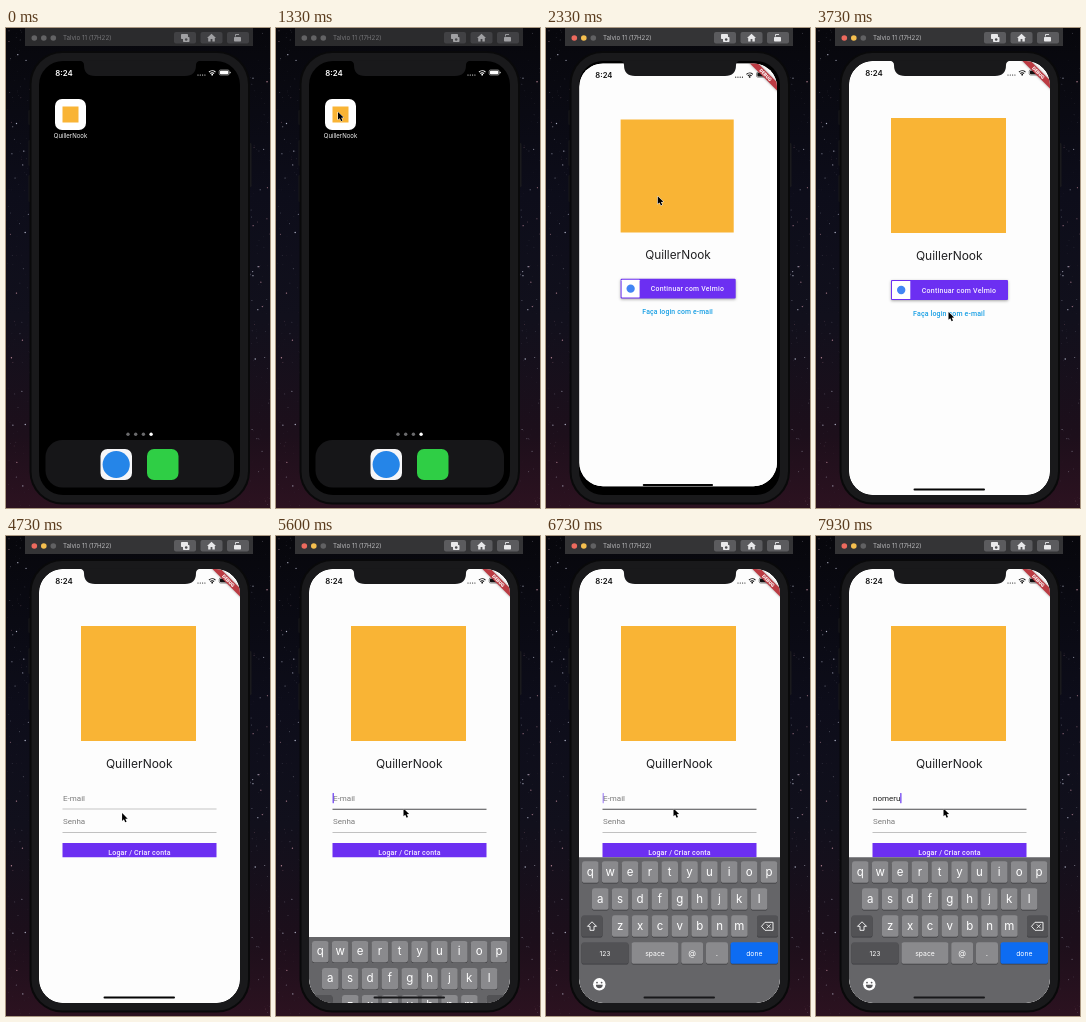
Write an HTML page with a canvas that moves like this. It is 264x480 px and loops after 8 s.

```html
<!DOCTYPE html>
<html lang="pt">
<head>
<meta charset="utf-8">
<title>Login demo</title>
<style>
html, body { margin: 0; width: 100%; height: 100%; overflow: hidden; background: #08080c; }
canvas { display: block; width: 264px; height: 480px; }
</style>
</head>
<body>
<canvas id="stage"></canvas>
<script>
const W = 264, H = 480, LOOP = 8000;
const SCR = { x: 33, y: 33, w: 201, h: 434 };
const ICON = { x: 49, y: 71, w: 31, h: 31 };
const APP = 'QuillerNook';
const SANS = 'Inter, "Open Sans", sans-serif';
const ROBO = 'Roboto, "Noto Sans", sans-serif';
const PURPLE = '#6c2ff2', ORANGE = '#f9b435';

const canvas = document.getElementById('stage');
const dpr = window.devicePixelRatio || 1;
canvas.width = W * dpr;
canvas.height = H * dpr;
let ctx = canvas.getContext('2d');

const clamp = v => Math.min(1, Math.max(0, v));
const mix = (a, b, p) => a + (b - a) * p;
const ramp = (t, a, b) => clamp((t - a) / (b - a));
const smooth = u => u * u * (3 - 2 * u);
const easeOut = u => 1 - (1 - u) ** 3;

function box(x, y, w, h, r, color) {
  ctx.beginPath();
  ctx.roundRect(x, y, w, h, r);
  ctx.fillStyle = color;
  ctx.fill();
}

function dot(x, y, r, color) {
  ctx.beginPath();
  ctx.arc(x, y, r, 0, Math.PI * 2);
  ctx.fillStyle = color;
  ctx.fill();
}

function line(color, width, ...pts) {
  ctx.beginPath();
  for (let i = 0; i < pts.length; i += 2) ctx.lineTo(pts[i], pts[i + 1]);
  ctx.strokeStyle = color;
  ctx.lineWidth = width;
  ctx.stroke();
}

function text(str, x, y, size, color, { font = SANS, weight = 400, align = 'center', gap = 0 } = {}) {
  ctx.font = `${weight} ${size}px ${font}`;
  ctx.letterSpacing = gap + 'px';
  ctx.textAlign = align;
  ctx.textBaseline = 'alphabetic';
  ctx.fillStyle = color;
  ctx.fillText(str, x, y);
}

function group(fn, alpha = 1) {
  ctx.save();
  ctx.globalAlpha *= alpha;
  fn();
  ctx.restore();
}

// Night sky, painted once
function paintSky() {
  const c = document.createElement('canvas');
  c.width = canvas.width;
  c.height = canvas.height;
  const main = ctx;
  ctx = c.getContext('2d');
  ctx.scale(dpr, dpr);
  const g = ctx.createLinearGradient(0, 0, 0, H);
  g.addColorStop(0, '#07070c');
  g.addColorStop(0.35, '#0d0d1a');
  g.addColorStop(0.6, '#11101c');
  g.addColorStop(0.85, '#1d0f1b');
  g.addColorStop(1, '#2c1220');
  ctx.fillStyle = g;
  ctx.fillRect(0, 0, W, H);
  let seed = 77;
  const rnd = () => (seed = (seed * 16807) % 2147483647) / 2147483647;
  for (let i = 0; i < 260; i++) {
    const left = rnd() < 0.5;
    const x = left ? rnd() * 24 : 243 + rnd() * 21;
    const b = rnd();
    ctx.globalAlpha = 0.15 + 0.75 * b ** 3;
    dot(x, rnd() * H, 0.3 + 0.4 * b ** 4, i % 4 ? '#c9cbe0' : '#c58fa0');
  }
  ctx = main;
  return c;
}
const sky = paintSky();

function titleBar(active) {
  box(19, 0, 228, 18, 0, active ? '#343436' : '#2b2b2d');
  const lights = active ? ['#ed6a5e', '#f5bf4f', '#616163'] : ['#626264', '#626264', '#626264'];
  lights.forEach((c, i) => dot(28.3 + i * 9.5, 10, 2.8, c));
  text('Talvio 11 (17H22)', 57, 12.2, 6.2, active ? '#b9b9bb' : '#77777a', { align: 'left' });
  const ink = active ? '#e8e8ea' : '#a0a0a3';
  for (const x of [168, 194.5, 221]) box(x, 4, 22, 11.5, 2, active ? '#5b5b5e' : '#414144');
  box(175, 6, 7, 5, 0.8, ink);
  box(177, 9, 6.5, 5, 0.8, ink);
  dot(180.2, 11.5, 1.3, '#4c4c4f');
  ctx.beginPath();
  for (const p of [[205.5, 5.8], [210, 10], [208.8, 10], [208.8, 13.5], [206.4, 13.5], [206.4, 11], [204.6, 11], [204.6, 13.5], [202.2, 13.5], [202.2, 10], [201, 10]]) ctx.lineTo(...p);
  ctx.fillStyle = ink;
  ctx.fill();
  box(228, 9, 7, 4.5, 0.8, ink);
  line(ink, 0.9, 229.5, 8.5, 229.5, 6.5, 233, 6.5);
}

function phoneBody() {
  for (const [x, y, h] of [[22.5, 82, 15], [22.5, 112, 26], [22.5, 147, 27], [243, 115, 44]]) box(x, y, 2.5, h, 1, '#1a1a1d');
  box(23.5, 23, 220.5, 453.5, 33, '#09090a');
  box(25.5, 25, 216.5, 449.5, 31, '#19191b');
  box(SCR.x, SCR.y, SCR.w, SCR.h, 24, '#000');
}

function notch() {
  ctx.beginPath();
  ctx.moveTo(73, 32.5);
  ctx.quadraticCurveTo(78, 33, 78, 37);
  ctx.quadraticCurveTo(78, 48, 89, 48);
  ctx.lineTo(179, 48);
  ctx.quadraticCurveTo(190, 48, 190, 37);
  ctx.quadraticCurveTo(190, 33, 195, 32.5);
  ctx.fillStyle = '#19191b';
  ctx.fill();
}

function statusBar(ink) {
  text('8:24', 58, 47.6, 7.8, ink, { weight: 600 });
  for (let i = 0; i < 4; i++) dot(192 + i * 2.3, 47, 0.6, ink);
  ctx.strokeStyle = ink;
  ctx.lineWidth = 1.1;
  for (const r of [2.6, 4.6]) {
    ctx.beginPath();
    ctx.arc(206.2, 47.4, r, -2.36, -0.78);
    ctx.stroke();
  }
  dot(206.2, 46.7, 0.9, ink);
  ctx.lineWidth = 0.5;
  ctx.beginPath();
  ctx.roundRect(213.2, 42, 10, 5, 1.4);
  ctx.stroke();
  box(214, 42.8, 8.4, 3.4, 0.8, ink);
  box(223.8, 43.7, 0.8, 1.6, 0.4, ink);
}

function home(p) {
  ctx.save();
  ctx.globalAlpha = 1 - 0.75 * p;
  statusBar('#fff');
  if (p > 0) {
    const s = 1 - 0.046 * p;
    ctx.filter = `blur(${4 * p * dpr}px)`;
    ctx.translate(133.5, 250);
    ctx.scale(s, s);
    ctx.translate(-133.5, -250);
  }
  if (p === 0) {
    box(ICON.x, ICON.y, ICON.w, ICON.h, 7, '#fff');
    box(56.5, 78.5, 16, 16, 0, ORANGE);
  }
  text(APP, 64.5, 109.8, 6, '#f2f2f2');
  for (let i = 0; i < 4; i++) dot(122 + i * 7.7, 406.2, 1.7, i === 3 ? '#fff' : '#6a6a6c');
  box(39.5, 412, 188.5, 47.5, 17, '#161618');
  box(94.5, 421, 31.5, 31, 7, '#f6f6f8');
  dot(110.2, 436.5, 13.6, '#2585e8');
  box(141, 421, 31.5, 31, 7, '#2fce45');
  ctx.restore();
}

function debugRibbon() {
  ctx.save();
  ctx.translate(SCR.x + SCR.w, SCR.y);
  ctx.rotate(Math.PI / 4);
  ctx.shadowColor = 'rgba(0,0,0,.4)';
  ctx.shadowBlur = 2.5 * dpr;
  ctx.fillStyle = '#bb3a42';
  ctx.fillRect(-22, 13.6, 44, 5.9);
  ctx.shadowColor = 'transparent';
  text('DEBUG', 0, 18.2, 4.8, '#fff', { font: ROBO, weight: 900 });
  ctx.restore();
}

function signInChoices() {
  ctx.save();
  ctx.shadowColor = 'rgba(0,0,0,.35)';
  ctx.shadowBlur = 3 * dpr;
  ctx.shadowOffsetY = dpr;
  box(75, 252, 117, 20, 1, PURPLE);
  ctx.restore();
  box(76, 253, 18.3, 18, 0.5, '#fff');
  dot(85.2, 262, 4.2, '#4285f4');
  text('Continuar com Velmio', 143, 264.5, 7, '#f4efff', { font: ROBO, weight: 500, gap: 0.25 });
  text('Faça login com e-mail', 133, 287.5, 7, '#189fe4', { font: ROBO, weight: 500, gap: 0.14 });
}

const USER = 'nomeru';
const KEY_TIMES = [7070, 7300, 7470, 7600, 7740, 7870];
const FOCUS = 5547;

function caretAlpha(t) {
  if (t < FOCUS) return 0;
  if (t < 6170 || t >= KEY_TIMES[0]) return 1;
  return t < 6670 ? 1 - easeOut(ramp(t, 6170, 6420)) : easeOut(ramp(t, 6670, 6920));
}

function emailForm(t) {
  const left = { font: ROBO, align: 'left' };
  const typed = USER.slice(0, KEY_TIMES.filter(k => t >= k).length);
  text(typed || 'E-mail', 57, 265, 8, typed ? '#222' : '#7c7c7c', left);
  const end = typed ? 57.3 + ctx.measureText(typed).width : 57;
  group(() => box(end - 0.4, 257, 1.2, 10.3, 0.5, '#6435f0'), caretAlpha(t));
  const focused = t >= FOCUS;
  box(56.5, 272.7, 154, focused ? 1 : 0.6, 0, focused ? '#4a4a4c' : '#8b8b8b');
  text('Senha', 57, 288, 8, '#7c7c7c', left);
  box(56.5, 296.5, 154, 0.6, 0, '#858585');
  box(56.5, 307, 154, 14.3, 0, PURPLE);
  text('Logar / Criar conta', 133.5, 318.6, 7, '#f4efff', { font: ROBO, weight: 500, gap: 0.2 });
}

function key(x, y, w, label, color, size = 6.8) {
  box(x, y + 0.7, w, 21.5, 2.6, '#3a3a3c');
  box(x, y, w, 21.5, 2.6, color);
  if (label) text(label, x + w / 2, y + (size > 9 ? 14.4 : 13.4), size, '#fff');
}

function keyboard(t) {
  const top = 321.3 + 146 * Math.exp(-(t - FOCUS) / 89);
  const light = '#8a8a8d', dark = '#525255';
  ctx.save();
  ctx.translate(0, top);
  box(SCR.x, 0, SCR.w, 160, 0, '#656568');
  [['qwertyuiop', 36], ['asdfghjkl', 46], ['zxcvbnm', 66]].forEach(([row, x], r) => {
    [...row].forEach((c, i) => key(x + i * 19.85, 4 + r * 27, 16.6, c, light, 11.5));
  });
  key(35.5, 58, 21, '', dark);
  key(211, 58, 21, '', dark);
  line('#fff', 0.9, 46, 64.5, 50.5, 69, 48, 69, 48, 73, 44, 73, 44, 69, 41.5, 69, 46, 64.5);
  line('#fff', 0.9, 215.5, 69, 219, 65, 227, 65, 227, 73, 219, 73, 215.5, 69);
  line('#fff', 0.8, 220.7, 67, 224.7, 71);
  line('#fff', 0.8, 224.7, 67, 220.7, 71);
  key(35.5, 85, 47, '123', dark);
  key(85.5, 85, 47, 'space', light);
  key(135.2, 85, 22, '@', light, 8);
  key(160, 85, 22, '.', light, 8);
  key(184.5, 85, 47.5, 'done', '#0d6cf2');
  dot(53.3, 127, 6.2, '#fff');
  dot(51, 125.3, 0.9, '#59595c');
  dot(55.6, 125.3, 0.9, '#59595c');
  ctx.beginPath();
  ctx.arc(53.3, 127.5, 3.4, 0, Math.PI);
  ctx.fillStyle = '#59595c';
  ctx.fill();
  ctx.restore();
}

function app(t) {
  box(SCR.x, SCR.y, SCR.w, SCR.h, 0, '#fdfdfd');
  statusBar('#111');
  box(75, 90, 115, 115, 0, ORANGE);
  text(APP, 133.3, 232.3, 12, '#1f1f21');
  const form = smooth(ramp(t, 3900, 4270));
  if (form < 1) group(signInChoices, 1 - form);
  if (form > 0) group(() => emailForm(t), form);
  debugRibbon();
  if (t >= FOCUS) keyboard(t);
  box(97.5, 460.6, 71.5, 2, 1, t < FOCUS ? '#050505' : '#18181a');
}

const OPEN = 1905;

function openAmount(t) {
  if (t < OPEN) return 0;
  if (t > 2500) return 1;
  const u = (t - OPEN) * 0.01376;
  return 1 - (1 + u) * Math.exp(-u);
}

function openingApp(t, p) {
  const w = mix(ICON.w, SCR.w, p);
  const h = mix(ICON.h, SCR.h, p ** 1.43);
  const x = mix(ICON.x, SCR.x, p);
  const y = mix(ICON.y + ICON.h / 2, SCR.y + SCR.h / 2, p) - h / 2;
  const shown = ramp(p, 0.05, 0.4);
  ctx.save();
  box(x, y, w, h, mix(7, 24, p), '#fdfdfd');
  ctx.clip();
  if (shown < 1) {
    const side = w * 0.52;
    group(() => box(x + (w - side) / 2, y + (h - side) / 2, side, side, 0, ORANGE), 1 - shown);
  }
  ctx.globalAlpha = shown;
  const s = w / SCR.w;
  ctx.translate(x, y);
  ctx.scale(s, s);
  ctx.translate(-SCR.x, -SCR.y);
  app(t);
  ctx.restore();
}

// start, end, x, y, easing
const MOVES = [
  [670, 1330, 62, 84, smooth],
  [1900, 2470, 112.5, 169.5, easeOut],
  [2730, 3400, 132.5, 284, smooth],
  [4530, 5070, 80, 262, smooth],
  [5210, 5340, 127.5, 272.5, smooth]
];

function pointer(t) {
  let x = -8, y = 150;
  for (const [a, b, px, py, ease] of MOVES) {
    const u = ease(ramp(t, a, b));
    x = mix(x, px, u);
    y = mix(y, py, u);
  }
  ctx.beginPath();
  for (const [dx, dy] of [[0, 0], [0, 7.8], [1.8, 6.2], [3.1, 9.2], [4.5, 8.6], [3.2, 5.7], [5.6, 5.6]]) ctx.lineTo(x + dx, y + dy);
  ctx.closePath();
  ctx.lineWidth = 1;
  ctx.lineJoin = 'round';
  ctx.strokeStyle = '#fff';
  ctx.stroke();
  ctx.fillStyle = '#000';
  ctx.fill();
}

function draw(t) {
  ctx.setTransform(1, 0, 0, 1, 0, 0);
  ctx.drawImage(sky, 0, 0);
  ctx.setTransform(dpr, 0, 0, dpr, 0, 0);
  titleBar(t >= 1470);
  phoneBody();
  ctx.save();
  ctx.clip();
  const p = openAmount(t);
  if (p < 1) home(p);
  if (p > 0) openingApp(t, p);
  ctx.restore();
  notch();
  pointer(t);
}

const start = performance.now();
function tick(now) {
  draw(Math.max(0, now - start) % LOOP);
  requestAnimationFrame(tick);
}
draw(0);
requestAnimationFrame(tick);
</script>
</body>
</html>
```
